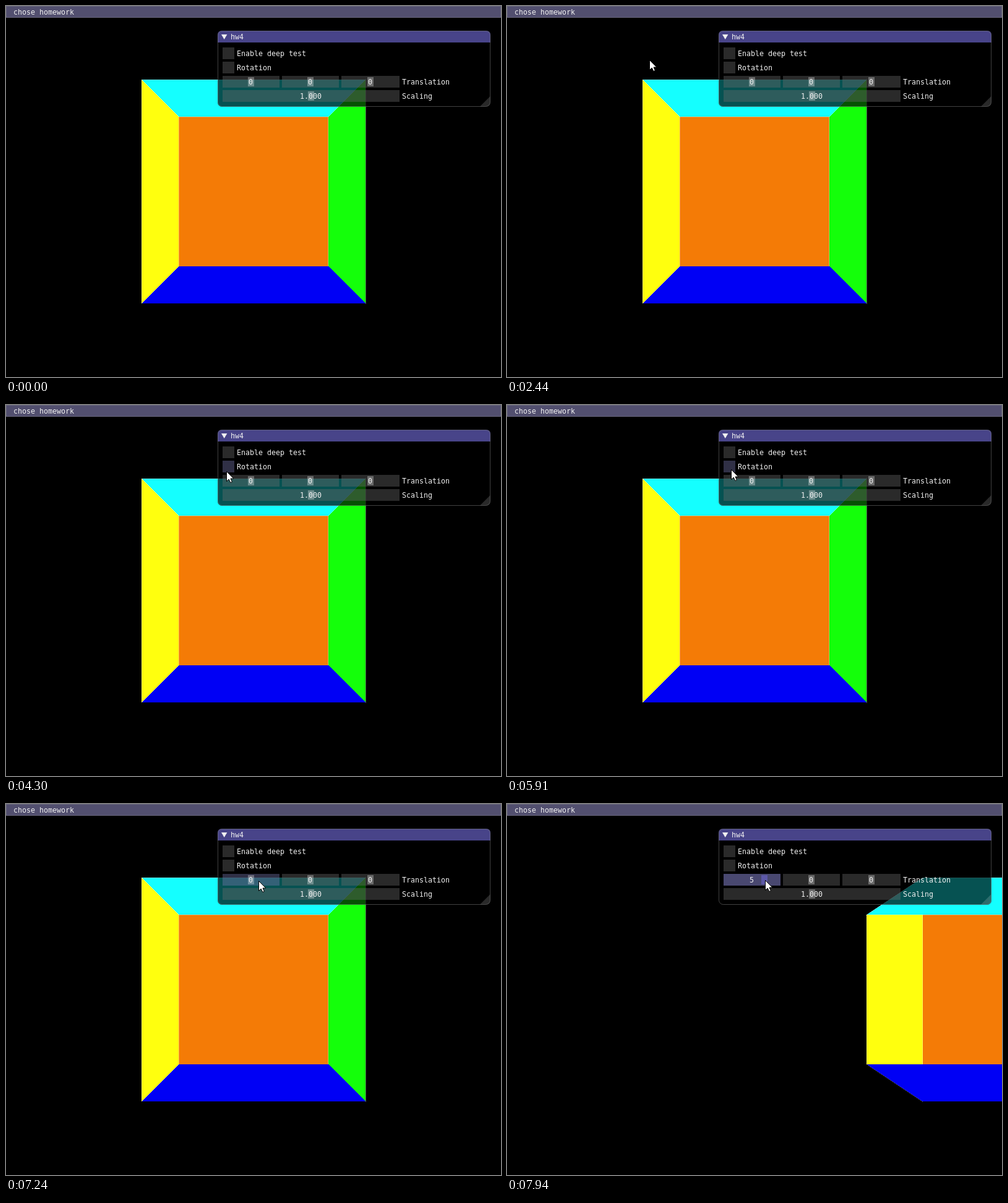
An HTML page for the animation above (8000 ms loop, 800 by 600 pixels).

```html
<!DOCTYPE html>
<html lang="en">
<head>
<meta charset="utf-8">
<title>Cube translation panel</title>
<style>
  html, body { margin: 0; width: 100%; height: 100%; overflow: hidden; background: #000; }
  svg { display: block; width: 800px; height: 600px; }
  text { font: 11.63px "DejaVu Sans Mono", monospace; fill: #f0f0f0; white-space: pre; }
  polygon { shape-rendering: crispEdges; }
</style>
</head>
<body>
<svg id="stage" viewBox="0 0 800 600"></svg>
<script>
const stage = document.getElementById('stage');
const LOOP = 8000;
const DRAG_START = 7510;

const FRAME = 'rgba(110,110,110,.39)';
const FRAME_HOVER = 'rgba(120,120,176,.4)';
const FRAME_ACTIVE = 'rgba(107,105,163,.69)';
const GRAB = 'rgba(255,255,255,.3)';
const GRAB_ACTIVE = 'rgba(105,99,204,.6)';

function add(tag, attrs, content) {
  const node = document.createElementNS('http://www.w3.org/2000/svg', tag);
  for (const key in attrs) node.setAttribute(key, attrs[key]);
  if (content !== undefined) node.textContent = content;
  return stage.appendChild(node);
}
const rect = (x, y, width, height, fill, more) => add('rect', { x, y, width, height, fill, ...more });
const label = (x, y, content) => add('text', { x, y }, content);

// Cube, painted in a fixed order without depth sorting
const FOCAL = 300 / Math.tan(Math.PI / 8);
const HALF = 2, CAMERA = 10;
const RING = [[-1, -1], [1, -1], [1, 1], [-1, 1]];
const PALE = 'rgba(255,255,255,.3)';

function face(axis, side, fill, stroke = 'none') {
  const corners = RING.map(([u, v]) => {
    const corner = [];
    corner[axis] = side;
    corner[(axis + 1) % 3] = u;
    corner[(axis + 2) % 3] = v;
    return corner;
  });
  return { corners, node: add('polygon', { fill, stroke }) };
}
const faces = [
  face(2, -1, '#f47b06'),
  face(0, -1, '#ffff0e', PALE),
  face(0, 1, '#14ff0a', PALE),
  face(1, 1, '#0000f5'),
  face(1, -1, '#14ffff', PALE)
];

function project([x, y, z], shift) {
  const scale = FOCAL / (CAMERA - z * HALF);
  return [400.1 + (x * HALF + shift) * scale, 300.1 + y * HALF * scale];
}

// Menu bar
rect(0, 0, 800, 19, '#524f6f');
rect(.5, .5, 799, 18, 'none', { stroke: '#69677d' });
label(12, 14, 'chose homework');

// Panel
rect(342, 40, 441, 123, 'rgba(0,0,0,.68)', { rx: 7 });
add('path', { d: 'M342 59V47q0-7 7-7h427q7 0 7 7v12z', fill: '#484489' });
add('path', { d: 'M766 162.5L782.5 146V156q0 6.5-6.5 6.5z', fill: 'rgba(255,255,255,.16)' });
rect(342.5, 40.5, 440, 122, 'none', { rx: 7, stroke: 'rgba(128,128,128,.5)' });
add('path', { d: 'M348 46h9.4l-4.7 8z', fill: '#f0f0f0' });
label(363, 54, 'hw4');

const rowY = row => 67 + 23 * row;

function control(x, row, width) {
  const y = rowY(row);
  return { x, y, width, node: rect(x, y, width, 19, FRAME) };
}
function slider(x, row, width, value) {
  const part = control(x, row, width);
  part.center = x + width / 2;
  part.grab = rect(part.center - 5, part.y + 2, 10, 15, GRAB);
  part.text = label(Math.floor(part.center - 3.5 * value.length), part.y + 14, value);
  return part;
}

const moveX = slider(350, 2, 92, '0');
const controls = [
  control(350, 0, 19),
  control(350, 1, 19),
  moveX,
  slider(446, 2, 92, '0'),
  slider(542, 2, 94, '0'),
  slider(350, 3, 286, '1.000')
];
['Enable deep test', 'Rotation', 'Translation', 'Scaling'].forEach((name, row) =>
  label(row < 2 ? 373 : 640, rowY(row) + 14, name));

const cursor = add('path', {
  d: 'M.5 .5V16.5L4.2 13.1 6.8 18.5 9.4 17.4 7 12H11.8Z',
  fill: '#fff', stroke: '#000'
});

// Pointer moves; it rests where each one ends
const ENTRY = { x: 330, y: -20 };
const moves = [
  { from: 670, to: 1470, x: 207, y: 45 },
  { from: 1500, to: 1900, x: 130, y: 404 },
  { from: 1900, to: 2300, x: 235, y: 88 },
  { from: 2340, to: 3140, x: 111, y: 54 },
  { from: 3170, to: 3600, x: 419, y: 113 },
  { from: 3600, to: 3970, x: 300, y: 137 },
  { from: 4000, to: 4370, x: 362, y: 104 },
  { from: 5910, to: 6310, x: 430, y: 120 },
  { from: 6570, to: 6910, x: 411, y: 130 },
  { from: 7070, to: 7240, x: 408, y: 124 },
  { from: 7510, to: 7770, x: 414, y: 124 },
  { from: 7900, to: 7940, x: 417, y: 123 }
];

const ease = k => k * k * (3 - 2 * k);

function pointerAt(t) {
  let { x, y } = ENTRY;
  for (const move of moves) {
    if (t < move.from) break;
    const k = ease(Math.min(1, (t - move.from) / (move.to - move.from)));
    x += (move.x - x) * k;
    y += (move.y - y) * k;
  }
  return [Math.round(x), Math.round(y)];
}

const contains = (c, x, y) => x >= c.x && x < c.x + c.width && y >= c.y && y < c.y + 19;

function draw(t) {
  const [x, y] = pointerAt(t);
  const dragging = t >= DRAG_START;
  const unit = 3.9;
  const shift = dragging ? Math.round((x - moveX.center) / unit) : 0;

  for (const { corners, node } of faces) {
    node.setAttribute('points', corners.map(c => project(c, shift)).join(' '));
  }
  for (const c of controls) {
    const active = dragging && c === moveX;
    c.node.setAttribute('fill', active ? FRAME_ACTIVE : contains(c, x, y) ? FRAME_HOVER : FRAME);
  }
  moveX.grab.setAttribute('x', Math.round(moveX.center - 5 + shift * unit));
  moveX.grab.setAttribute('fill', dragging ? GRAB_ACTIVE : GRAB);
  moveX.text.textContent = shift;
  cursor.setAttribute('transform', `translate(${x} ${y})`);
}

const start = performance.now();
function tick() {
  draw((performance.now() - start) % LOOP);
  requestAnimationFrame(tick);
}
tick();
</script>
</body>
</html>
```
